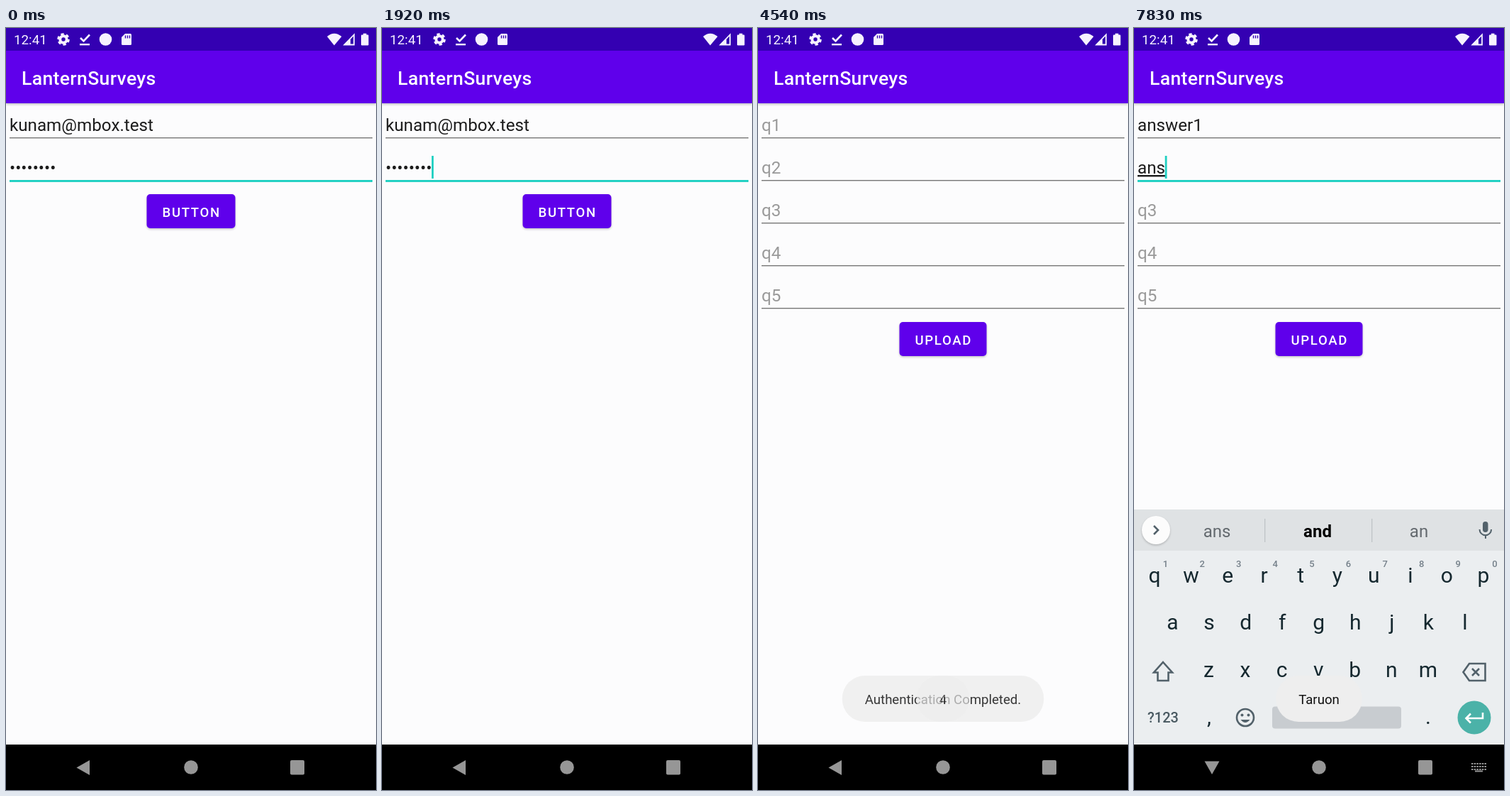
Animation, 522 px wide and 1073 px high, one loop 8 s. Source, as an HTML page:

```html
<!DOCTYPE html>
<html lang="en">
<head>
<meta charset="utf-8">
<title>Survey app</title>
<style>
  html, body { margin: 0; width: 100%; height: 100%; overflow: hidden; background: #000; }
  svg { display: block; width: 100vw; height: 100vh; font-family: Roboto, "Noto Sans", sans-serif; }
  .mid { text-anchor: middle; }
  .title { font-size: 26.6px; font-weight: 500; letter-spacing: .33px; fill: #fff; }
  .field { font-size: 24.2px; fill: #1c1c1c; }
  .field.hint { fill: #9a9a9a; }
  .field.composing { text-decoration: underline; text-decoration-thickness: 1.3px; }
  .label { font-size: 18.6px; font-weight: 500; letter-spacing: 1.66px; fill: #fff; }
  .item { font-size: 26.6px; fill: #6f6f6e; }
  .toast { font-size: 18.6px; fill: #111; text-anchor: middle; }
  .key { font-size: 30px; fill: #15282f; text-anchor: middle; }
  .digit { font-size: 13px; font-weight: 500; fill: #75808a; text-anchor: middle; }
  .word { font-size: 24px; fill: #646a6f; text-anchor: middle; }
  .icon { fill: none; stroke: #52616a; stroke-width: 2.6; }
</style>
</head>
<body>
<svg id="stage" viewBox="0 0 522 1073" preserveAspectRatio="none"></svg>
<script>
const LOOP = 8000;
const PURPLE = '#5f00eb', TEAL = '#1fd0c2', GREY = '#969696';
const APP = 'LanternSurveys';
const PEOPLE = ['Sorimun Tak', 'Taruon', 'Boryeum', 'ST'];

const rect = (x, y, w, h, fill, more = '') =>
  `<rect x="${x}" y="${y}" width="${w}" height="${h}" fill="${fill}" ${more}/>`;
const circle = (x, y, r, fill, more = '') =>
  `<circle cx="${x}" cy="${y}" r="${r}" fill="${fill}" ${more}/>`;
const text = (x, y, cls, s, more = '') => `<text x="${x}" y="${y}" class="${cls}" ${more}>${s}</text>`;
const path = (d, more = 'class="icon"') => `<path d="${d}" ${more}/>`;

const button = (x, y, w, label) =>
  rect(x, y + 1.5, w, 48, '#000', 'rx="5" opacity=".22" filter="url(#soft)"') +
  rect(x, y, w, 48, PURPLE, 'rx="5"') +
  text(x + 22, y + 31.5, 'label', label);

const field = (i, id, value, cls = 'field') =>
  text(5, 145 + i * 60, cls, value, `id="${id}${i}"`) +
  rect(5, 154 + i * 60, 512, 1.4, '#777', `id="${id}line${i}"`);

const cursor = id => rect(5, 120, 2.8, 32, TEAL, `id="${id}"`);

const screen = (id, content) => `<g id="${id}">
  ${rect(0, 0, 522, 1073, '#fcfcfd')}
  ${rect(0, 32, 522, 76, '#000', 'opacity=".2" filter="url(#soft)"')}
  ${rect(0, 0, 522, 106, PURPLE)}${rect(0, 0, 522, 32, '#3400b2')}
  ${text(22, 79.5, 'title', APP)}${content}
  ${rect(0, 1009, 522, 64, '#000')}</g>`;

function loginScreen() {
  return screen('login',
    field(0, 'l', 'kunam@mbox.test') + field(1, 'l', '•'.repeat(8)) + cursor('loginCursor') +
    button(198.5, 234, 125, 'BUTTON') +
    '<g clip-path="url(#buttonClip)">' + circle(261, 258, 0, '#fff', 'id="ripple"') + '</g>');
}

const listScreen = () =>
  screen('list', PEOPLE.map((name, i) => text(27, 161 + i * 89, 'item', name)).join(''));

const formScreen = () => screen('form',
  [0, 1, 2, 3, 4].map(i => field(i, 'q', 'q' + (i + 1), 'field hint')).join('') +
  cursor('formCursor') + button(199.5, 414, 123, 'UPLOAD'));

function keyRow(chars, x0, y) {
  return [...chars].map((c, i) => text(x0 + i * 51.55, y, 'key', c)).join('');
}

function keyboard() {
  const digits = [...'1234567890'].map((d, i) => text(44.5 + i * 51.6, 759, 'digit', d)).join('');
  const tools = `<g id="tools">
    ${path('M35 701l-6 6 6 6')}
    ${circle(98, 704, 7, 'none', 'class="icon"')}${path('M103 709l8 9')}
    ${path('M167 698h18v12l-7 7h-11zM185 709h-7v8M171 708q4 5 8 1M171 703h2M179 703h2')}
    ${text(251, 714, 'mid', 'GIF', 'font-size="19" font-weight="900" fill="#5f6b73"')}
    ${rect(317, 696, 24, 24, '#6a757c', 'rx="2"')}
    ${rect(374.5, 692, 1.3, 30, '#c3c8cb')}
    ${[414, 422, 430].map(x => circle(x, 707, 3, '#5f6b73')).join('')}</g>`;
  const words = `<g id="words">
    ${path('M28 701l6 6-6 6')}
    ${rect(184, 691, 1.3, 33, '#bfc4c7')}${rect(335, 691, 1.3, 33, '#bfc4c7')}
    ${text(117, 717, 'word', '', 'id="w0"')}
    ${text(259, 717, 'word', '', 'id="w1" style="font-weight:700;fill:#000"')}
    ${text(402, 717, 'word', '', 'id="w2"')}</g>`;
  return `<g id="keyboard">
    ${rect(0, 678, 522, 331, '#ebeef0')}${rect(0, 678, 522, 58, '#dfe2e4')}
    ${circle(31, 708.5, 20, '#000', 'opacity=".2" filter="url(#soft)"')}${circle(31, 707, 20, '#fcfcfc')}
    ${tools}${words}
    ${rect(492, 695, 7.5, 15, '#52616a', 'rx="3.7"')}
    ${path('M487.500 706a8.300 8.300 0 0 0 16.600 0M496 714v5', 'class="icon" style="stroke-width:2"')}
    ${keyRow('qwertyuiop', 29, 781)}${digits}
    ${keyRow('asdfghjkl', 54.5, 847)}${keyRow('zxcvbnm', 105.5, 914)}
    ${path('M41 893L54 907.500H48.500V919H33.500V907.500H28Z')}
    ${path('M473 895H495.500V919H473L464.500 907ZM477 902l10 10M487 902l-10 10')}
    ${text(41, 978, 'mid', '?123', 'font-size="20" font-weight="500" fill="#4a5a62"')}
    ${text(106, 980, 'key', ',')}${text(415, 980, 'key', '.')}
    ${circle(157, 971, 12, 'none', 'class="icon"')}
    ${circle(152.5, 967.5, 2, '#52616a')}${circle(161.5, 967.5, 2, '#52616a')}
    ${path('M150.500 974q6.500 8 13 0z', 'fill="#52616a"')}
    ${rect(195, 955.5, 182, 31, '#c8ccd0', 'rx="4"')}
    ${circle(480, 971, 23.5, '#4bb2a8')}
    ${path('M492 964v8h-23M475 965.500l-6.500 6.500 6.500 6.500', 'fill="none" stroke="#fff" stroke-width="2.6"')}
  </g>`;
}

function statusIcons() {
  return `<g fill="#f6f2ff">
    ${text(11, 23, '', '12:41', 'font-size="18.8"')}
    ${circle(81, 16, 4.7, 'none', 'stroke="#f6f2ff" stroke-width="4"')}
    ${circle(81, 16, 7.4, 'none', 'stroke="#f6f2ff" stroke-width="2.8" stroke-dasharray="4.300 3.450"')}
    ${path('M105 14l4.500 4.500 8.500-9', 'fill="none" stroke="#f6f2ff" stroke-width="2.6"')}
    ${rect(104, 22, 14, 2.4, '#f6f2ff')}
    ${circle(140.5, 16, 8.8, '#f6f2ff')}
    ${path('M168 8h7.500q1.500 0 1.500 1.500v13q0 1.500-1.500 1.500h-11q-1.500 0-1.500-1.500v-9.500z', '')}
    ${path('M168.500 10.500v4M171.500 10.500v4M174.500 10.500v4', 'stroke="#3400b2" stroke-width="1.4"')}
    ${path('M453 12q10-8.500 20.500 0L463 24.500z', '')}
    ${path('M491 9.500V23.500H477.500Z', 'fill="none" stroke="#f6f2ff" stroke-width="1.8"')}
    ${path('M486 14.500V24H476z', '')}
    ${rect(501, 9.5, 10.5, 15, '#f6f2ff', 'rx="1.2"')}${rect(504, 7.7, 4.5, 3, '#f6f2ff')}</g>`;
}

function navIcons() {
  const dots = y => path(`M476 ${y}h21`, `stroke="${GREY}" stroke-width="2" stroke-dasharray="2.500 1.200"`);
  return path('M-10 .5L8.500-10V11Z', `id="back" fill="${GREY}"`) +
    circle(261, 1041, 9.8, GREY) + rect(401, 1031, 20, 20.5, GREY, 'rx="2"') +
    `<g id="imeSwitch">${dots(1036)}${dots(1040)}${dots(1044)}${rect(481, 1045.5, 11, 2, GREY)}</g>`;
}

const toasts = [
  { text: 'Authentication Completed.', from: 2440, to: 4340 },
  { text: '4', from: 4340, to: 6340 },
  { text: PEOPLE[1], from: 6340, to: 8340 }
];

const stage = document.getElementById('stage');
stage.innerHTML = `<defs>
    <filter id="soft" x="-10%" y="-20%" width="120%" height="140%"><feGaussianBlur stdDeviation="1.500"/></filter>
    <clipPath id="buttonClip"><rect x="198.500" y="234" width="125" height="48" rx="5"/></clipPath>
  </defs>` +
  loginScreen() + listScreen() + formScreen() + keyboard() +
  toasts.map((m, i) => `<g id="toast${i}">${rect(0, 912, 0, 65, '#eeeeee', 'rx="32"')}
    ${text(261, 952, 'toast', m.text)}</g>`).join('') +
  statusIcons() + navIcons();

const el = id => document.getElementById(id);
const set = (node, attrs) => { for (const k in attrs) node.setAttribute(k, attrs[k]); };
const show = (id, on) => el(id).setAttribute('display', on ? 'inline' : 'none');
const clamp = x => Math.min(1, Math.max(0, x));
const span = (t, start, length) => clamp((t - start) / length);

// Two cubic segments: a fast start with a very slow landing.
function extraSlowIn(x) {
  const [X, Y] = x < 1 / 6
    ? [[0, .05, .1333, .1667], [0, 0, .06, .4]]
    : [[.1667, .2083, .25, 1], [.4, .82, 1, 1]];
  const at = (p, s) => {
    const r = 1 - s;
    return r * r * r * p[0] + 3 * r * r * s * p[1] + 3 * r * s * s * p[2] + s * s * s * p[3];
  };
  let lo = 0, hi = 1;
  for (let i = 0; i < 24; i++) {
    const s = (lo + hi) / 2;
    if (at(X, s) < x) lo = s; else hi = s;
  }
  return at(Y, lo);
}

const scaled = k => `translate(261 536.5) scale(${k}) translate(-261 -536.5)`;

const screens = [
  { id: 'login', opens: -1000 },
  { id: 'list', opens: 2737 },
  { id: 'form', opens: 3950 }
];

function drawScreens(t) {
  screens.forEach(({ id, opens }, i) => {
    const closes = i < 2 ? screens[i + 1].opens : Infinity;
    const enter = extraSlowIn(span(t, opens, 400));
    const leave = t > closes ? extraSlowIn(span(t, closes, 400)) : 0;
    show(id, t >= opens && t < closes + 400);
    set(el(id), {
      transform: scaled((.85 + .15 * enter) * (1 + .05 * leave)),
      opacity: span(t, opens + 50, 83)
    });
  });
}

function drawLine(id, focused) {
  set(el(id), { height: focused ? 2.9 : 1.4, fill: focused ? TEAL : '#777' });
}

function drawLogin(t) {
  drawLine('lline1', true);
  show('loginCursor', t >= 460 && Math.floor((t - 460) / 500) % 2 === 0);
  set(el('loginCursor'), { x: 70, y: 180 });
  const press = span(t, 2250, 225);
  set(el('ripple'), { r: 70 * press, opacity: .22 * (1 - span(t, 2420, 250)) });
}

const FOCUS = 4850, NEXT_FIELD = 7290;
const answers = [
  { word: 'answer1', times: [5790, 6000, 6210, 6420, 6630, 6840, 7040] },
  { word: 'ans', times: [7460, 7630, 7830] }
];
const suggestions = {
  a: ['and', 'at'], an: ['and', 'any'], ans: ['and', 'an'], answ: ['answer', 'answers'],
  answe: ['answer', 'answers'], answer: ['answer', 'answers'], answer1: ['answer', 'answers']
};

function drawForm(t) {
  const active = t < FOCUS ? -1 : t < NEXT_FIELD ? 0 : 1;
  let typing = '';
  answers.forEach(({ word, times }, i) => {
    const typed = word.slice(0, times.filter(x => t >= x).length);
    const node = el('q' + i);
    node.textContent = typed || 'q' + (i + 1);
    node.setAttribute('class', 'field' + (typed ? '' : ' hint') + (typed && i === active ? ' composing' : ''));
    drawLine('qline' + i, i === active);
    if (i === active) {
      typing = typed;
      const end = typed ? node.getComputedTextLength() - .3 : 0;
      set(el('formCursor'), { x: 5 + end, y: 120 + i * 60 });
    }
  });
  const blinkedOff = t >= FOCUS + 500 && t < answers[0].times[0];
  show('formCursor', active >= 0 && !blinkedOff);
  show('tools', !typing);
  show('words', typing);
  [typing, ...(suggestions[typing] || ['', ''])].forEach((s, i) => { el('w' + i).textContent = s; });
}

function drawKeyboard(t) {
  const opens = 5084;
  const rest = (1 - span(t, opens, 250)) ** 5;
  show('keyboard', t >= opens);
  set(el('keyboard'), { transform: `translate(0 ${58 * rest})`, opacity: 1 - rest });
  const turn = span(t, 4990, 150);
  set(el('back'), { transform: `translate(109.5 1041) rotate(${-90 * turn})` });
  show('imeSwitch', turn > 0);
}

function drawToasts(t) {
  toasts.forEach(({ from, to }, i) => {
    const node = el('toast' + i);
    const fadeIn = 1 - (1 - span(t, from, 500)) ** 2;
    const fadeOut = 1 - span(t, to, 500) ** 2;
    node.setAttribute('opacity', fadeIn * fadeOut);
    const width = node.querySelector('text').getComputedTextLength() + 64;
    set(node.querySelector('rect'), { x: 261 - width / 2, width });
  });
}

function draw(t) {
  drawScreens(t);
  drawLogin(t);
  drawForm(t);
  drawKeyboard(t);
  drawToasts(t);
}

const start = performance.now();
function tick() {
  draw((performance.now() - start) % LOOP);
  requestAnimationFrame(tick);
}
tick();
</script>
</body>
</html>
```
